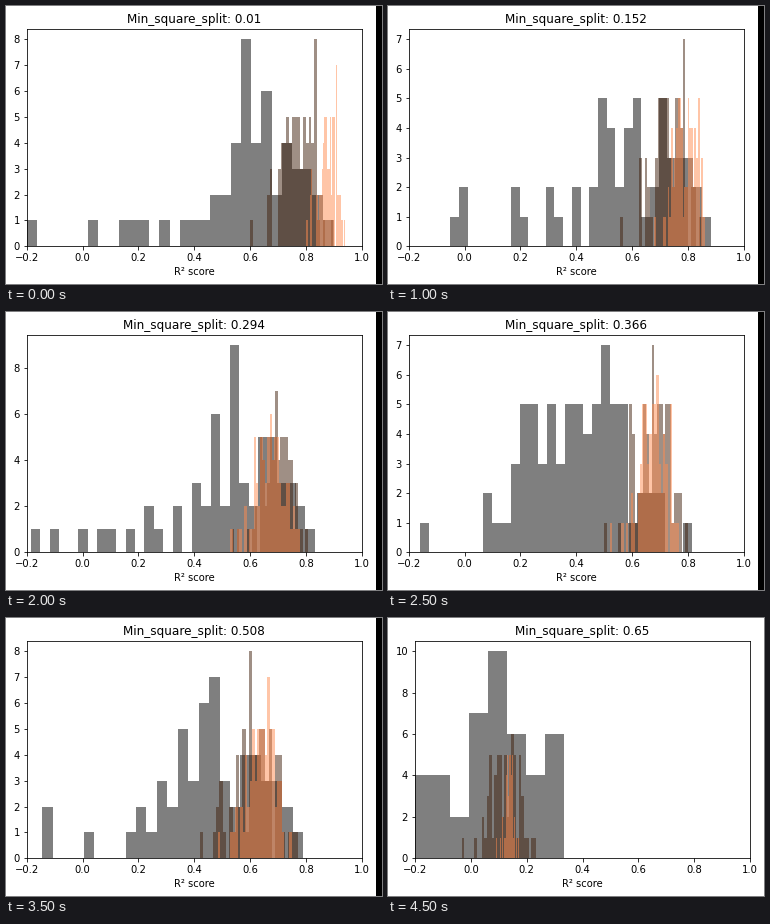
Write a matplotlib script that moves like this. It is 376 by 278 pixels and loops after 5000 ms.

```python
import numpy as np
import matplotlib.pyplot as plt
from matplotlib.animation import FuncAnimation
from matplotlib.patches import Rectangle

W, H, DPI = 376, 278, 72
AX_W, AX_H, AX_BOTTOM = 334.8, 217.44, 37.7
STEPS, BINS = 10, 30
SPLITS = np.linspace(0.01, 0.65, STEPS)
WIDE, MEDIUM, NARROW = "black", "#40200c", "#ff8c50"

# Wide bars: range, bins of the stray scores, start and counts of the main hump.
# Four plain values mean a sampled histogram: range, peak place, peak count.
BASE = [
    (-.2, .897, (0, 6, 9, 10, 11, 13, 15, 16, 17), 18, (2, 2, 4, 8, 4, 6, 2, 4)),
    (-.13, .89, .6, 8),
    (-.051, .882, (0, 1, 1, 7, 7, 8, 11, 11, 12, 14, 14), 16,
     (2, 5, 4, 2, 4, 5, 1, 2, 5)),
    (-.12, .861, .55, 8),
    (-.185, .832, (0, 2, 5, 7, 8, 10, 12, 12, 13, 15, 15), 17,
     (3, 2, 6, 2, 9, 3, 2, 5, 5)),
    (-.16, .814, .5, 7),
    (-.193, .81, (0, 1, 5, 8, 9, 10, 12, 14), 15, (3, 2, 6, 2, 4, 3, 3, 6)),
    (-.332, .79, (5, 5, 9, 13, 14, 14, 15), 16, (3, 2, 5, 3, 6, 7, 3, 2, 4, 4)),
    (-.361, .683, (6, 6, 8, 12, 14, 15), 16, (4, 3, 4, 5, 2, 5, 3, 4, 2, 5, 5)),
    (-1.706, .334, (), 22, (4, 4, 2, 7, 10, 6, 4, 6)),
]
MID = [
    (.6, .9, .834, 8), (.56, .87, .805, 7), (.557, .85, .784, 7),
    (.55, .84, .735, 7), (.535, .808, .693, 7), (.5, .8, .675, 7),
    (.42, .79, .706, 7), (.42, .773, .601, 8), (.42, .683, .511, 6),
    (-.032, .234, .15, 6),
]
TOP = [
    (.8, .942, .911, 7), (.73, .907, .852, 6), (.68, .86, .801, 5),
    (.62, .81, .752, 6), (.53, .778, .672, 6), (.52, .77, .69, 6),
    (.49, .755, .667, 6), (.485, .75, .669, 7), (.43, .615, .584, 6),
    (.09, .172, .14, 8),
]


def sample(lo, hi, peak, top, seed):
    """Counts of a seeded normal sample with its tallest bar fixed."""
    span = hi - lo
    scores = np.random.default_rng(seed).normal(lo + .6 * span, span / 5.5, 72)
    counts = np.minimum(np.histogram(scores, BINS, (lo, hi))[0], 5)
    counts[[0, -1]] = 1
    counts[int((peak - lo) / span * BINS)] = top
    return lo, hi, counts


def hump(lo, hi, strays, start, run):
    """Stray single scores, then the main run, then a level shoulder."""
    counts = np.zeros(BINS, int)
    np.add.at(counts, list(strays), 1)
    counts[start:] = 3
    counts[-2:] = 2, 1
    counts[start:start + len(run)] = run
    return lo, hi, counts


def bars(lo, hi, counts, color):
    edges = np.linspace(lo, hi, BINS + 1)
    ax.bar(edges[:-1], counts, np.diff(edges), align="edge",
           color=color, alpha=0.5)


def draw(i):
    last = i == STEPS - 1
    left = 27.1 if last else 20.8
    ax.clear()
    ax.set_position([left / W, AX_BOTTOM / H, AX_W / W, AX_H / H])
    base = BASE[i]
    layers = [hump(*base) if len(base) == 5 else sample(*base, i),
              sample(*MID[i], STEPS + i), sample(*TOP[i], 2 * STEPS + i)]
    for layer, color in zip(layers, (WIDE, MEDIUM, NARROW)):
        bars(*layer, color)
    ax.set_xlim(-0.2, 1)
    ax.set_ylim(0, 1.05 * max(max(counts) for _, _, counts in layers))
    ax.set_title(f"Min_square_split: {round(SPLITS[i], 3)}")
    ax.set_xlabel("R² score")
    strip.set_visible(not last)
    return []


plt.rcParams["font.family"] = "DejaVu Sans"
fig = plt.figure(figsize=(W / DPI, H / DPI), dpi=DPI, facecolor="white")
ax = fig.add_axes([0.1, 0.1, 0.8, 0.8])
strip = fig.add_artist(Rectangle((370 / W, 0), 6 / W, 1, color="black", lw=0))

anim = FuncAnimation(fig, draw, frames=STEPS, interval=500,
                     init_func=lambda: [], repeat=True, repeat_delay=0)
plt.show()
```
